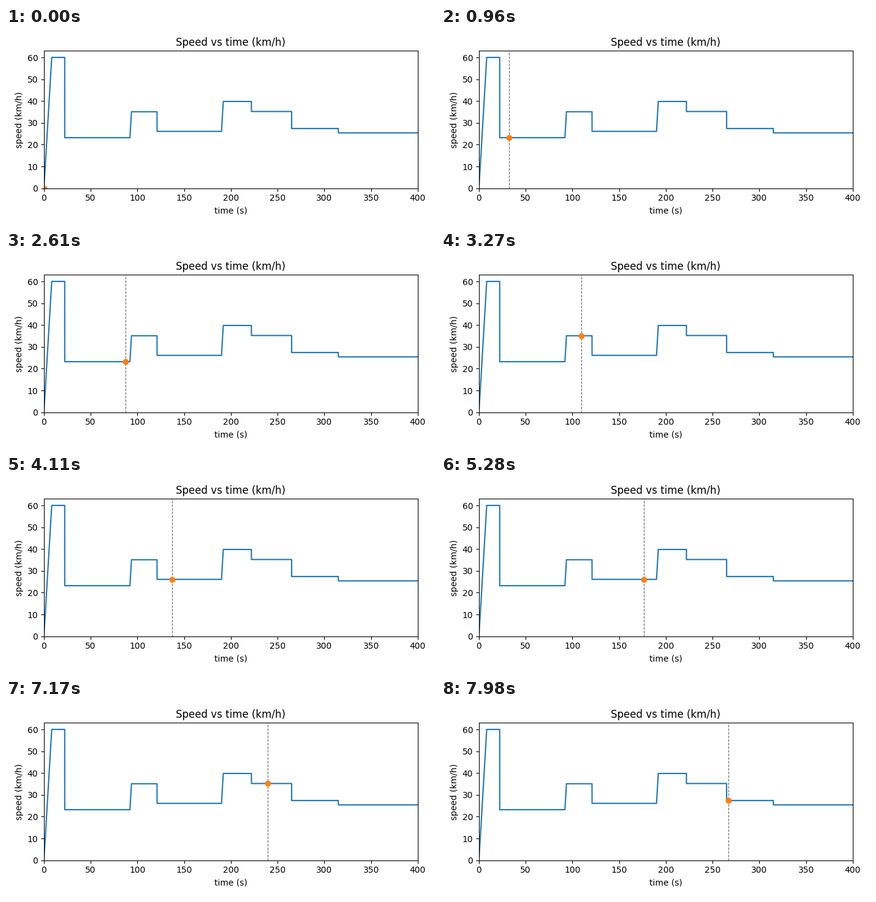
A matplotlib script that plays this animation: 700x320 px, repeating every 8000 ms.

```python
import numpy as np
import matplotlib.pyplot as plt
from matplotlib.animation import FuncAnimation

LOOP_MS = 8000
FRAMES = 267          # one sample step per frame
ACCEL = 2 * 3.6       # km/h gained per second

# (start time in s, speed limit in km/h)
LIMITS = [(0, 60), (22.2, 23.2), (92, 35.1), (121, 26.1), (190, 39.8),
          (222, 35.2), (265, 27.4), (315, 25.4)]


def speed_profile(limits, end):
    """Ramp up at constant acceleration, drop at once."""
    points, speed = [(0, 0)], 0
    for start, limit in limits:
        points.append((start, speed))
        ramp = max(limit - speed, 0) / ACCEL
        points.append((start + max(ramp, 0.05), limit))
        speed = limit
    points.append((end, speed))
    return np.array(points).T


samples = np.linspace(0, 400, 400)
times, speeds = speed_profile(LIMITS, 400)

fig, ax = plt.subplots(figsize=(7, 3.2), dpi=100)
ax.plot(times, speeds)
ax.set_xlim(0, 400)
ax.set_ylim(0, 63)
ax.set_title("Speed vs time (km/h)")
ax.set_xlabel("time (s)")
ax.set_ylabel("speed (km/h)")
cursor = ax.axvline(0, color="k", ls="--", lw=0.8, alpha=0.6)
dot, = ax.plot([0], [0], "o", color="C1")
fig.tight_layout()


def update(i):
    t = samples[i]
    cursor.set_xdata([t, t])
    dot.set_data([t], [np.interp(t, times, speeds)])
    return cursor, dot


anim = FuncAnimation(fig, update, frames=FRAMES, interval=LOOP_MS / FRAMES,
                     init_func=lambda: update(0), repeat=True, repeat_delay=0)
plt.show()
```
